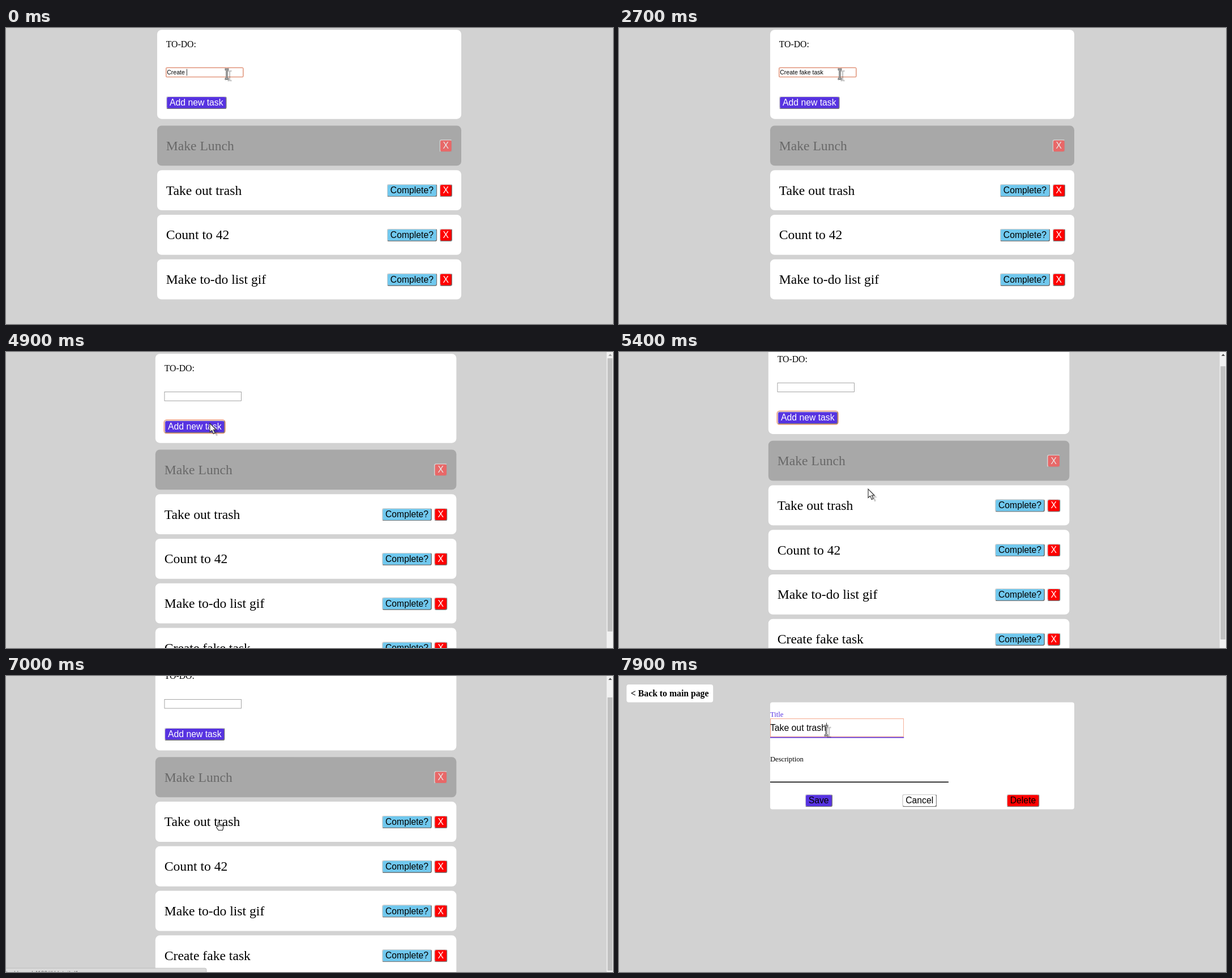
Recreate the animation shown at these times as an HTML page. Size 1072 by 523 pixels, loop 8000 ms.

```html
<!DOCTYPE html>
<html lang="en">
<head>
<meta charset="utf-8">
<title>To-do list</title>
<style>
html, body { margin: 0; width: 100%; height: 100%; overflow: hidden; background: #d2d2d2; }
#page {
  position: absolute; width: 1362px; height: 665px; overflow: hidden;
  transform: scale(.7875); transform-origin: 0 0;
  font: 20px/23px "Liberation Serif", serif; color: #000;
  --left: 339px; --width: 682px;
}
#page.long { --left: 335.25px; --width: 674.5px; }
#page div, #page p { position: absolute; margin: 0; box-sizing: border-box; white-space: pre; }
#page .card { left: var(--left); width: var(--width); background: #fff; border-radius: 10px; }
#page .task {
  height: 90px; padding: 0 20px; display: flex; align-items: center; gap: 5px;
  font-size: 30px; line-height: 34px;
}
.task b { flex: 1; font-weight: normal; }
#page .done { background: #808080; opacity: .5; }
.btn {
  display: inline-block; box-sizing: border-box; height: 29px; padding: 1px 6px;
  border: 2px solid; border-color: #d0d0d0 #777 #777 #d0d0d0; border-radius: 5px;
  font: 20px/23px "Liberation Sans", Arial, sans-serif; background: #fff;
}
.blue { background: #70c8ee; }
.red { background: #f00; }
.purple { background: #5733e1; }
.light { color: #fff; }
#page .btn.at { position: absolute; }
#page .field { border: 1px solid #8c8c8c; background: #fff; font-family: "Liberation Sans", Arial, sans-serif; }
#page .field.focus { border-color: #e08e72; border-radius: 2px; box-shadow: 0 0 0 .8px #e08e72; }
.btn.focus { box-shadow: 0 0 0 1.5px #f0a084; }
.caret { display: inline-block; width: 1.3px; background: #000; vertical-align: top; }
#page .small { font-size: 16px; line-height: 18px; }
#page #title { left: 339px; top: 95px; width: 300px; height: 44px; border-bottom: 2.5px solid #000;
  font: 20px/23px "Liberation Sans", Arial, sans-serif; padding-top: 10px; }
#page #title.focus { border-bottom-color: #5733e1; box-shadow: inset 0 0 0 1.4px #f5a98f; }
#page #buttons { left: 339px; top: 265px; width: 682px; display: flex; justify-content: space-around; }
#page #status {
  left: -2px; top: 655px; width: 452px; height: 24px; padding: 2px 0 0 1px;
  background: #dadada; border: 1px solid #b8b8b8; border-radius: 0 4px 0 0;
  font: 12.8px/18px "Noto Sans", sans-serif; color: #707070;
}
#page #bar { left: 1347px; top: 0; width: 15px; height: 665px; background: #f1f1f1; }
#page #thumb { left: 2px; width: 11px; height: 613px; background: #c1c1c1; }
#arrowUp { position: absolute; left: 3.5px; top: 4px; border: 4px solid transparent; border-top: 0; border-bottom: 5px solid; }
#pointer { position: absolute; left: 0; top: 0; width: 100%; height: 100%; overflow: hidden; }
</style>
</head>
<body>
<div id="page">
  <div id="main">
    <div class="card" style="top:4px;height:200px">
      <p style="left:20px;top:21px">TO-DO:</p>
      <div id="entry" class="field" style="left:20px;top:85px;width:173px;height:21px;padding:1.5px 1px;font-size:13.333px;line-height:15px"><span id="typed"></span><i id="caret" class="caret" style="height:15px"></i></div>
      <span id="add" class="btn at purple light" style="left:20px;top:149px">Add new task</span>
    </div>
  </div>
  <div id="detail">
    <div style="left:16.5px;top:19px;height:40px;padding:8.5px 10px;background:#fff;border-radius:5px;font-weight:bold">&lt; Back to main page</div>
    <div style="left:339px;top:59px;width:682px;height:240px;background:#fff;border-radius:5px"></div>
    <p class="small" style="left:339px;top:78px;color:#5733e1">Title</p>
    <div id="title">Take out trash<i id="titleCaret" class="caret" style="height:23px"></i></div>
    <span class="btn at blue" style="right:346px;top:95px">Completed?</span>
    <p class="small" style="left:339px;top:178px">Description</p>
    <div style="left:339px;top:236.5px;width:400px;height:2.5px;background:#000"></div>
    <div id="buttons"><span class="btn purple">Save</span><span class="btn">Cancel</span><span class="btn red">Delete</span></div>
  </div>
  <div id="bar"><i id="arrowUp"></i><div id="thumb"></div></div>
  <div id="status">taskboard:4100/#/details/1</div>
</div>
<svg id="pointer">
  <defs>
    <filter id="soft" x="-50%" y="-50%" width="200%" height="200%"><feGaussianBlur stdDeviation=".7"/></filter>
    <path id="arrowShape" d="M0 0V15.5L3.6 12.3L6.3 18.5L9 17.3L6.4 11.3H11Z"/>
    <path id="beamShape" d="M-3.5-8.5H-1.5L0-7.5L1.5-8.5H3.5M0-7.5V7.5M-3.5 8.5H-1.5L0 7.5L1.5 8.5H3.5"/>
  </defs>
  <g id="arrow">
    <use href="#arrowShape" x="5" y="4" opacity=".2" filter="url(#soft)"/>
    <use href="#arrowShape" fill="#f4f4f4" stroke="#333" stroke-width="1.1"/>
  </g>
  <g id="beam" fill="none">
    <use href="#beamShape" x="5" y="3" stroke="#000" stroke-width="2.4" opacity=".22" filter="url(#soft)"/>
    <use href="#beamShape" stroke="#333" stroke-width="3"/>
    <use href="#beamShape" stroke="#fff" stroke-width="1"/>
  </g>
  <g id="hand">
    <path d="M-1.5 8V1Q-.2-1 1 1V5Q2.5 4 3.5 5.4Q5 4.6 5.7 6Q7.5 5.5 7.6 7.5V11L6.5 14.5H-.8L-4.3 9.5Q-4.6 7 -1.5 8Z" fill="#fff" stroke="#222" stroke-width="1.1"/>
    <path d="M1 5V8M3.5 5.6V8M5.7 6.4V8.4" stroke="#222" stroke-width=".8"/>
  </g>
</svg>
<script>
const $ = id => document.getElementById(id);
const LOOP = 8000, STEP = 100;
const keyTimes = [300, 400, 600, 800, 1000, 1600, 1700, 1900, 2100];

// time, x, y of the pointer's hot spot
const path = [
  [0, 390, 81.5], [3000, 390, 81.5], [3100, 417, 74.5], [3200, 417, 74.5], [3300, 414, 80],
  [3500, 398, 118], [3700, 374, 145], [3900, 364, 134], [4400, 364, 134], [4500, 362, 130],
  [4800, 362, 130], [4900, 360, 126], [5000, 368, 132], [5300, 432, 232], [5400, 440, 242],
  [5600, 440, 245], [5700, 440, 245], [6000, 405, 253], [6300, 376, 258], [7100, 376, 258],
  [7500, 368, 106], [7600, 366, 96.5], [LOOP, 366, 96.5]
];
const scrollKeys = [[0, 0], [5200, 0], [5300, 7], [5400, 20], [5500, 32], [5600, 37], [LOOP, 37]];

const tasks = ["Make Lunch", "Take out trash", "Count to 42", "Make to-do list gif", "Create fake task"];
const cards = tasks.map((name, i) => {
  const card = document.createElement("div");
  card.className = "card task" + (i ? "" : " done");
  card.style.top = 219 + 100 * i + "px";
  card.innerHTML = `<b>${name}</b>` + (i ? '<span class="btn blue">Complete?</span>' : "") +
    '<span class="btn red light">X</span>';
  $("main").append(card);
  return card;
});

function sample(keys, t) {
  const i = keys.findIndex(k => k[0] > t);
  const a = keys[i - 1], b = keys[i], f = (t - a[0]) / (b[0] - a[0]);
  return a.slice(1).map((v, n) => v + (b[n + 1] - v) * f);
}

const show = (id, on) => $(id).style.display = on ? "" : "none";
const focus = (id, on) => $(id).classList.toggle("focus", on);

function pointerKind(t, y) {
  if (t < 4000) return y < 88 ? "beam" : "arrow";
  if (t >= 7100) return y < 110 ? "beam" : "arrow";
  return t >= 6000 ? "hand" : "arrow";
}

function draw() {
  const t = Math.floor(performance.now() % LOOP / STEP) * STEP;
  const detail = t >= 7100, added = t >= 4400;
  const [x, y] = sample(path, t), [scroll] = sample(scrollKeys, t);

  show("main", !detail);
  show("detail", detail);
  show("bar", added && !detail);
  show("status", t >= 6100 && !detail);
  $("page").classList.toggle("long", added && !detail);
  cards[4].style.display = added ? "" : "none";

  $("typed").textContent = t < 4200 ? "Create " + "fake task".slice(0, keyTimes.filter(k => k <= t).length) : "";
  $("caret").style.visibility = t < 2700 || t >= 3300 && t < 3800 ? "visible" : "hidden";
  focus("entry", t < 4100);
  focus("add", t >= 4100 && t < 7000);
  focus("title", t >= 7800);
  show("titleCaret", t >= 7900);

  $("main").style.transform = `translateY(${-scroll}px)`;
  $("thumb").style.top = 14 + scroll * .92 + "px";
  $("arrowUp").style.borderBottomColor = scroll ? "#505050" : "#a3a3a3";

  const kind = pointerKind(t, y);
  for (const id of ["arrow", "beam", "hand"]) show(id, id === kind);
  $(kind).setAttribute("transform", `translate(${x} ${y})`);
  requestAnimationFrame(draw);
}
draw();
</script>
</body>
</html>
```
